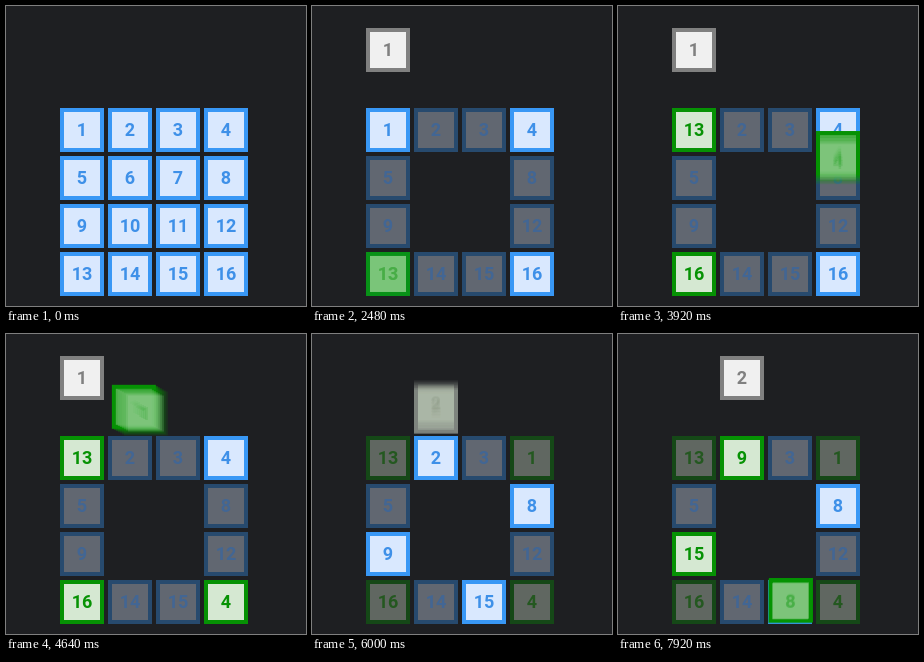
An HTML page with a canvas for the animation above (8 s loop, 300x300 px).

```html
<!DOCTYPE html>
<html lang="en">
<head>
<meta charset="utf-8">
<title>Rotating a matrix in place</title>
<style>
  html, body { margin: 0; width: 100%; height: 100%; overflow: hidden; background: #1e1f22; }
  canvas { display: block; width: 100vmin; height: 100vmin; }
</style>
</head>
<body>
<canvas id="stage"></canvas>
<script>
const LOOP = 8000, SIZE = 44, STEP = 48, DIM = 0.36;
const BG = [30, 31, 34];
const STYLES = {
  blue:  { edge: [56, 151, 245], fill: [217, 232, 254], text: [62, 144, 232], dimText: [66, 102, 148] },
  green: { edge: [6, 146, 4], fill: [213, 232, 210], text: [6, 146, 4], dimText: [36, 88, 32] },
  gray:  { edge: [128, 128, 128], fill: [240, 240, 240], text: [128, 128, 128], dimText: [128, 128, 128] },
  lift:  { edge: [128, 134, 128], fill: [200, 216, 192], text: [120, 136, 116], dimText: [128, 128, 128] }
};

const corners = [0, 3, 12, 15], second = [1, 7, 14, 8], inner = [5, 6, 9, 10];
const slot = i => [54 + i % 4 * STEP, 102 + (i >> 2) * STEP];
const tempSpot = i => [54 + i * STEP, 22];

const MOVE = 400, LIFT = 280;
// a value flies from one place to a slot and turns it green
const moves = [
  { at: 2480, n: 13, from: slot(12), to: 0 },
  { at: 3140, n: 16, from: slot(15), to: 12 },
  { at: 3800, n: 4, from: slot(3), to: 15 },
  { at: 4464, n: 1, from: tempSpot(0), to: 3 },
  { at: 6452, n: 9, from: slot(8), to: 1 },
  { at: 7002, n: 15, from: slot(14), to: 8 },
  { at: 7552, n: 8, from: slot(7), to: 14 }
];
const lifts = [
  { at: 1918, n: 1, col: 0, fade: 4880, gone: 5190 },
  { at: 5838, n: 2, col: 1, fade: LOOP, gone: LOOP + 300 }
];

const canvas = document.getElementById('stage');
const ctx = canvas.getContext('2d');
const ratio = Math.max(1, window.devicePixelRatio || 1);
canvas.width = canvas.height = 300 * ratio;

const ramp = (t, a, b) => Math.min(1, Math.max(0, (t - a) / (b - a)));
const mix = (a, b, k) => a.map((v, i) => v + (b[i] - v) * k);
const rgb = c => `rgb(${c.map(Math.round).join(',')})`;

// ease-in-out, cubic-bezier(.42, 0, .58, 1)
function ease(p) {
  let lo = 0, hi = 1, s = p;
  for (let i = 0; i < 16; i++) {
    const x = 1.26 * s * (1 - s) * (1 - s) + 1.74 * s * s * (1 - s) + s * s * s;
    if (x < p) lo = s; else hi = s;
    s = (lo + hi) / 2;
  }
  return s * s * (3 - 2 * s);
}

function drawCell([x, y], n, style, light = 1, alpha = 1) {
  if (alpha <= 0) return;
  const shade = c => rgb(mix(BG, c, light));
  ctx.globalAlpha = alpha;
  ctx.fillStyle = shade(style.edge);
  ctx.fillRect(x, y, SIZE, SIZE);
  ctx.fillStyle = shade(style.fill);
  ctx.fillRect(x + 4, y + 4, SIZE - 8, SIZE - 8);
  ctx.fillStyle = rgb(mix(style.text, style.dimText, (1 - light) / (1 - DIM)));
  ctx.fillText(n, x + SIZE / 2, y + 28.4);
  ctx.globalAlpha = 1;
}

// average of a few positions around t, weighted equally
function drawMoving(t, start, length, from, to, n, style, alpha = 1) {
  const count = t > start - 10 && t < start + length + 10 ? 7 : 1;
  for (let i = 0; i < count; i++) {
    const when = count > 1 ? t - 10 + i * 20 / (count - 1) : t;
    const spot = mix(from, to, ease(ramp(when, start, start + length)));
    drawCell(spot, n, style, 1, alpha / (i + 1));
  }
}

function brightness(i, t) {
  const turn = ramp(t, 5400, 5650);
  if (corners.includes(i)) return 1 - (1 - DIM) * turn;
  const back = second.includes(i) ? turn : 0;
  return 1 - (1 - DIM) * ramp(t, 1000, 1330) * (1 - back);
}

function drawGrid(t) {
  for (let i = 0; i < 16; i++) {
    if (inner.includes(i)) {
      drawCell(slot(i), i + 1, STYLES.blue, 1, 1 - ramp(t, 40, 450));
      continue;
    }
    const landed = moves.find(m => m.to === i && t >= m.at + MOVE);
    drawCell(slot(i), landed ? landed.n : i + 1, landed ? STYLES.green : STYLES.blue, brightness(i, t));
  }
}

function drawLift(t, { at, n, col, fade, gone }) {
  if (t < at || t >= gone) return;
  const k = ramp(t, at, at + LIFT), style = {};
  const tone = ramp(k, 0.6, 1);
  for (const key in STYLES.gray) style[key] = mix(STYLES.lift[key], STYLES.gray[key], tone);
  const alpha = ramp(k, 0, 0.62) * (1 - ramp(t, fade, gone));
  drawMoving(t, at, LIFT, slot(col), tempSpot(col), n, style, alpha);
}

function draw(t) {
  ctx.setTransform(ratio, 0, 0, ratio, 0, 0);
  ctx.fillStyle = rgb(BG);
  ctx.fillRect(0, 0, 300, 300);
  ctx.font = '700 18px Roboto, Arial, sans-serif';
  ctx.textAlign = 'center';
  drawGrid(t);
  lifts.forEach(l => drawLift(t, l));
  for (const { at, n, from, to } of moves) {
    if (t < at - 28 || t >= at + MOVE) continue;
    drawMoving(t, at, MOVE, from, slot(to), n, STYLES.green, ramp(t, at - 28, at + 14));
  }
}

const began = performance.now();
function tick() {
  draw((performance.now() - began) % LOOP);
  requestAnimationFrame(tick);
}
tick();
</script>
</body>
</html>
```
